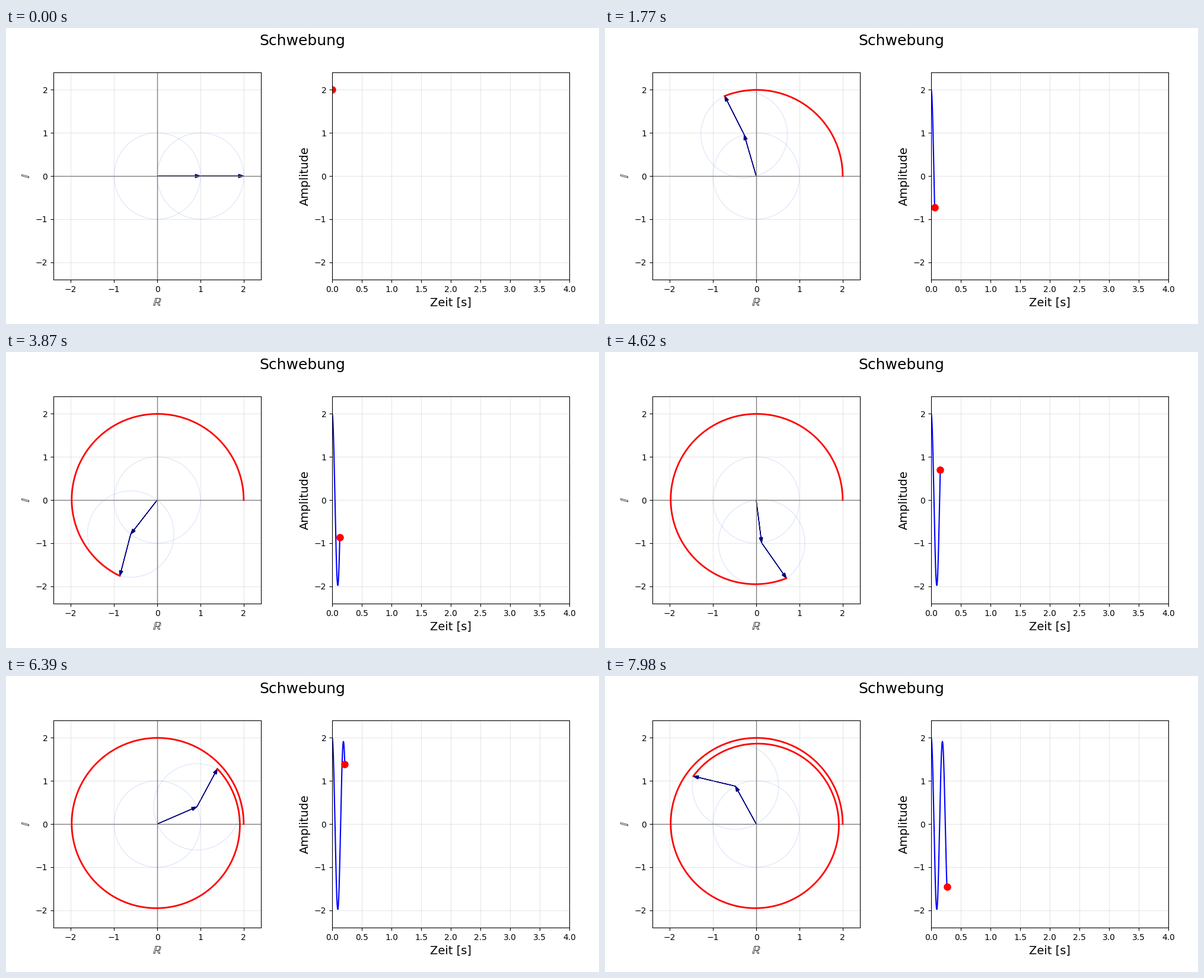
Recreate the animation shown at these times as a matplotlib script. Size 1000x500 px, loop 8 s.

```python
import numpy as np
import matplotlib.pyplot as plt
from matplotlib.animation import FuncAnimation
from matplotlib.patches import Circle

LOOP_MS = 8000
FRAMES = 267
STEP = 0.001            # simulated seconds per frame
FREQS = (5.0, 5.5)      # Hz
LIMIT = 2.4

t = np.arange(FRAMES) * STEP
first, second = (np.exp(2j * np.pi * f * t) for f in FREQS)
total = first + second

fig = plt.figure(figsize=(10, 5), dpi=100)
fig.suptitle("Schwebung", fontsize=18)


def make_axes(rect, xlim, xlabel, ylabel):
    ax = fig.add_axes(rect)
    ax.set_xlim(*xlim)
    ax.set_ylim(-LIMIT, LIMIT)
    ax.set_xlabel(xlabel, fontsize=14)
    ax.set_ylabel(ylabel, fontsize=14)
    ax.grid(alpha=0.3)
    return ax


plane = make_axes([0.08, 0.15, 0.35, 0.7], (-LIMIT, LIMIT),
                  r"$\mathbb{R}$", r"$\mathbb{I}$")
wave = make_axes([0.55, 0.15, 0.4, 0.7], (0, 4), "Zeit [s]", "Amplitude")

plane.axhline(0, color="gray", lw=1)
plane.axvline(0, color="gray", lw=1)


def make_circle(x):
    ring = Circle((x, 0), 1, fill=False, ec="cornflowerblue", lw=1, alpha=0.2)
    return plane.add_patch(ring)


def make_arrow(x):
    return plane.arrow(x, 0, 1, 0, head_width=0.08, head_length=0.12,
                       length_includes_head=True, color="navy", lw=1)


make_circle(0)
moving_circle = make_circle(1)
arrows = [make_arrow(0), make_arrow(1)]
trail, = plane.plot([], [], color="red", lw=2)
curve, = wave.plot([], [], color="blue", lw=1.5)
dot, = wave.plot([], [], "o", color="red", ms=8)


def point_arrow(arrow, start, vector):
    arrow.set_data(x=start.real, y=start.imag, dx=vector.real, dy=vector.imag)


def update(n):
    joint = first[n]
    point_arrow(arrows[0], 0j, joint)
    point_arrow(arrows[1], joint, second[n])
    moving_circle.center = joint.real, joint.imag

    path = total[:n + 1]
    trail.set_data(path.real, path.imag)
    curve.set_data(t[:n + 1], path.real)
    dot.set_data([t[n]], [total[n].real])
    return [*arrows, moving_circle, trail, curve, dot]


anim = FuncAnimation(fig, update, frames=FRAMES, init_func=lambda: update(0),
                     interval=LOOP_MS / FRAMES, repeat=True, repeat_delay=0)
plt.show()
```
